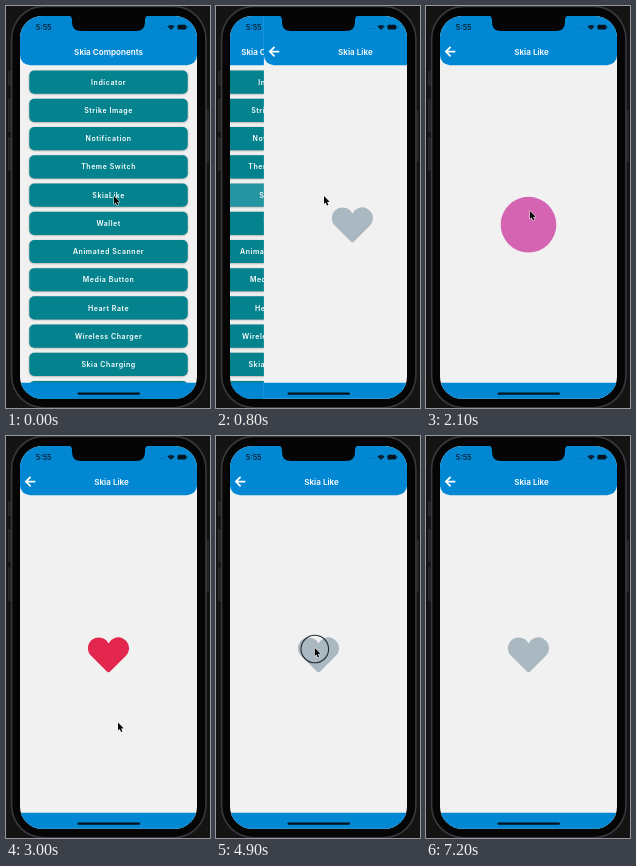
Recreate the animation shown at these times as an HTML page with a canvas. Size 204 by 402 pixels, loop 7.8 s.

```html
<!DOCTYPE html>
<html lang="en">
<head>
<meta charset="utf-8">
<title>Skia Components</title>
<style>
html, body { margin: 0; width: 100%; height: 100%; overflow: hidden; background: #141415; }
canvas { display: block; width: 204px; height: 402px; filter: blur(0.4px); }
</style>
</head>
<body>
<canvas id="stage"></canvas>
<script>
const W = 204, H = 402, LOOP = 7800;
const BLUE = '#0288d3', PAPER = '#f1f1f1', TEAL = '#04838e';
const GREY = '#aab8c2', RED = '#e2264d';
const FONT = 'Inter, "Liberation Sans", sans-serif';
const LEFT = 14, WIDTH = 177, TOP = 10, BOTTOM = 392.8;
const HEART = { x: 102.5, y: 218.7 };

const items = ['Indicator', 'Strike Image', 'Notification', 'Theme Switch', 'SkiaLike', 'Wallet',
  'Animated Scanner', 'Media Button', 'Heart Rate', 'Wireless Charger', 'Skia Charging', ''];

// Burst dots: angle in degrees, reach, radius, colour
const dots = [
  [-128, 42, 2.3, '#978e96'], [-70, 40.5, 2.3, '#8b91a2'], [-30, 41.5, 2.4, '#968e98'],
  [11, 36.5, 2.3, '#8d96a3'], [70, 41, 2.3, '#4e869d'], [128, 42, 2.3, '#8f8e97'],
  [190, 39, 2.3, '#49839a'], [-111, 33.5, 1.8, '#a39ca4'], [-59, 34.5, 1.9, '#9295bb'],
  [-11, 34, 1.8, '#ab9596'], [44, 34.5, 1.8, '#a19aa1'], [95, 33.5, 1.8, '#7d9187'],
  [148, 32, 1.7, '#a1a0a3'], [200, 33.5, 1.8, '#98a3b0']
];

// Pointer keys: time, x, y
const path = [
  [0, 108, 190], [850, 108, 190], [1150, 104, 205], [2600, 104, 205], [3000, 112, 286.5],
  [3100, 112, 286.5], [3450, 98.8, 212], [6550, 98.8, 212], [7200, 143, 404], [LOOP, 143, 404]
];
const clicks = [[400, 550], [1700, 1850], [3500, 3600], [4900, 5050], [6100, 6200]];
const likes = [[1700, 3600], [4900, 6200]];

const canvas = document.getElementById('stage');
const ctx = canvas.getContext('2d');
const dpr = window.devicePixelRatio || 1;
canvas.width = W * dpr;
canvas.height = H * dpr;

const clamp = v => Math.max(0, Math.min(1, v));
const ramp = (t, a, b) => clamp((t - a) / (b - a));
const smooth = v => v * v * (3 - 2 * v);
const easeOut = v => 1 - (1 - v) * (1 - v);
const mix = (a, b, v) => a + (b - a) * v;

function box(x, y, w, h, r, color) {
  ctx.beginPath();
  ctx.roundRect(x, y, w, h, r);
  ctx.fillStyle = color;
  ctx.fill();
}

function circle(x, y, r, color) {
  ctx.beginPath();
  ctx.arc(x, y, r, 0, 7);
  ctx.fillStyle = color;
  ctx.fill();
}

function label(text, x, y, size, color = '#fff', spacing = 0) {
  ctx.font = `600 ${size}px ${FONT}`;
  ctx.letterSpacing = spacing + 'px';
  ctx.textAlign = 'center';
  ctx.fillStyle = color;
  ctx.fillText(text, x + spacing / 2, y);
}

function bars() {
  box(LEFT, 0, WIDTH, 59.2, [0, 0, 10, 10], BLUE);
  box(LEFT, 376.8, WIDTH, 30, 0, BLUE);
}

function drawList(pressed) {
  box(LEFT, 0, WIDTH, H, 0, PAPER);
  items.forEach((name, i) => {
    const y = 76.2 + i * 28.22;
    ctx.save();
    ctx.shadowColor = 'rgba(0,0,0,.35)';
    ctx.shadowBlur = 2 * dpr;
    ctx.shadowOffsetY = 0.5 * dpr;
    box(23.3, y - 11.6, 158.4, 23.2, 5, pressed && i === 4 ? '#2495a0' : TEAL);
    ctx.restore();
    label(name, 102.3, y + 2.6, 7, '#fff', 0.55);
  });
  bars();
  label('Skia Components', 102.5, 48.7, 8.1);
}

// Two lobes joined by 45 degree sides meeting in a rounded tip
function heart(scale, color) {
  if (scale <= 0) return;
  const lobe = 10.8, cx = 9.75, cy = -6.5;
  const dip = Math.acos(cx / lobe), side = lobe * Math.SQRT1_2;
  ctx.save();
  ctx.translate(HEART.x, HEART.y);
  ctx.scale(scale, scale);
  ctx.beginPath();
  ctx.arc(-cx, cy, lobe, Math.PI * 0.75, -dip);
  ctx.arc(cx, cy, lobe, Math.PI + dip, Math.PI * 0.25);
  ctx.arcTo(0, cx + cy + 2 * side, -cx - side, cy + side, 2.3);
  ctx.closePath();
  ctx.fillStyle = color;
  ctx.fill();
  ctx.restore();
}

function burst(u) {
  const r = 33 * easeOut(ramp(u, 250, 500));
  const hole = r * ramp(u, 430, 680);
  if (r > 0 && hole < r) {
    const v = ramp(u, 250, 500);
    ctx.beginPath();
    ctx.arc(HEART.x, HEART.y, r, 0, 7);
    ctx.arc(HEART.x, HEART.y, hole, 0, 7, true);
    ctx.fillStyle = `rgb(${mix(226, 204, v)},${mix(38, 142, v)},${mix(77, 245, v)})`;
    ctx.fill('evenodd');
  }
  if (u < 660 || u > 950) return;
  const reach = mix(0.66, 1, ramp(u, 660, 800));
  ctx.globalAlpha = 1 - ramp(u, 810, 950);
  for (const [deg, dist, size, color] of dots) {
    const a = deg * Math.PI / 180;
    circle(102 + Math.cos(a) * dist * reach, 218 + Math.sin(a) * dist * reach, size, color);
  }
  ctx.globalAlpha = 1;
}

function drawLike(t) {
  box(LEFT, 0, WIDTH, H, 0, PAPER);
  bars();
  label('Skia Like', 105.5, 48.7, 8.1);
  ctx.beginPath();
  ctx.moveTo(29.3, 45.6);
  ctx.lineTo(20, 45.6);
  ctx.moveTo(24.6, 40.9);
  ctx.lineTo(19.9, 45.6);
  ctx.lineTo(24.6, 50.3);
  ctx.strokeStyle = '#fff';
  ctx.lineWidth = 1.7;
  ctx.stroke();

  const live = likes.find(([a, b]) => t >= a && t < b);
  if (!live) return heart(1, GREY);
  const u = t - live[0];
  if (u < 300) heart(1 - smooth(ramp(u, 100, 270)), GREY);
  burst(u);
  heart(1.12 * smooth(ramp(u, 450, 770)) - 0.12 * smooth(ramp(u, 810, 980)), RED);
}

function drawPhone() {
  box(0, 0, W, H, 0, '#141415');
  for (const [x, y, h] of [[2, 65, 15], [2, 93, 33], [2, 131, 34], [199, 104, 52]])
    box(x, y, 4, h, 1, '#262628');
  box(4.8, -0.4, 195.9, 403, 33, '#38393b');
  box(6.4, 1.2, 192.7, 399.8, 31.5, '#050506');
}

function drawStatus() {
  // Notch with flared shoulders
  ctx.beginPath();
  ctx.moveTo(62, 9);
  ctx.quadraticCurveTo(66, 10, 66, 14);
  ctx.lineTo(66, 16);
  ctx.quadraticCurveTo(66, 25, 75, 25);
  ctx.lineTo(130, 25);
  ctx.quadraticCurveTo(139, 25, 139, 16);
  ctx.lineTo(139, 14);
  ctx.quadraticCurveTo(139, 10, 143, 9);
  ctx.fillStyle = '#050506';
  ctx.fill();

  label('5:55', 37.7, 24, 7.3, '#082338');
  for (let x = 154.5; x < 160; x += 2) circle(x, 22.6, 0.5, 'rgba(8,35,56,.45)');
  ctx.beginPath();
  ctx.moveTo(165, 24);
  ctx.arc(165, 24, 5, -Math.PI * 0.76, -Math.PI * 0.24);
  ctx.closePath();
  ctx.fillStyle = '#082338';
  ctx.fill();
  box(171.5, 18.8, 8.6, 4.8, 1.4, '#06131d');
  box(180.5, 20.2, 0.9, 2, 0.4, '#06131d');
  box(71.5, 386.4, 62.5, 2.4, 1.2, '#06131d');
}

function drawPointer(t) {
  const i = path.findIndex((k, n) => n && t < k[0]);
  const [t0, x0, y0] = path[i - 1], [t1, x1, y1] = path[i];
  const v = smooth(ramp(t, t0, t1));
  const x = mix(x0, x1, v), y = mix(y0, y1, v);
  if (clicks.some(([a, b]) => t >= a && t < b)) {
    ctx.beginPath();
    ctx.arc(x, y + 1, 13.8, 0, 7);
    ctx.strokeStyle = 'rgba(20,28,32,.9)';
    ctx.lineWidth = 1.1;
    ctx.stroke();
  }
  ctx.save();
  ctx.translate(x, y);
  ctx.scale(0.88, 0.88);
  ctx.beginPath();
  for (const [px, py] of [[0, 0], [0, 9.2], [2, 7.4], [3.4, 10.8], [5, 10.1], [3.6, 6.9], [6.4, 6.6]])
    ctx.lineTo(px, py);
  ctx.closePath();
  ctx.lineJoin = 'round';
  ctx.strokeStyle = 'rgba(255,255,255,.85)';
  ctx.lineWidth = 1.2;
  ctx.stroke();
  ctx.fillStyle = '#050505';
  ctx.fill();
  ctx.restore();
}

// Critically damped spring for the screen push
function pushAt(t) {
  if (t < 583) return 0;
  if (t >= 1150) return 1;
  const k = (t - 583) * 0.014;
  return 1 - (1 + k) * Math.exp(-k);
}

function draw(t) {
  ctx.setTransform(dpr, 0, 0, dpr, 0, 0);
  drawPhone();
  const push = pushAt(t);
  ctx.save();
  ctx.beginPath();
  ctx.roundRect(LEFT, TOP, WIDTH, BOTTOM - TOP, 22);
  ctx.clip();
  if (push < 1) {
    ctx.save();
    ctx.translate(-push * WIDTH * 0.3, 0);
    drawList(t >= 400);
    ctx.restore();
  }
  if (push > 0) {
    ctx.translate((1 - push) * WIDTH, 0);
    drawLike(t);
  }
  ctx.restore();
  drawStatus();
  if (t < 7200) drawPointer(t);
}

const start = performance.now();
function tick() {
  draw((performance.now() - start) % LOOP);
  requestAnimationFrame(tick);
}
tick();
</script>
</body>
</html>
```
